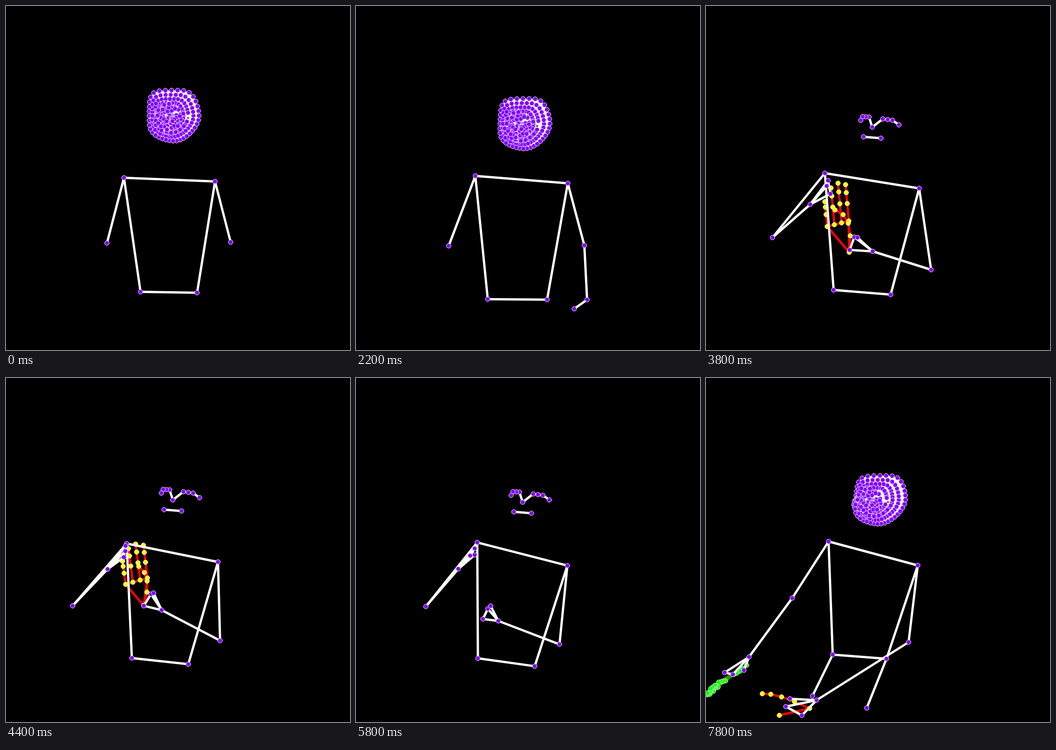
Write an HTML page with a canvas that moves like this. It is 748 px wide and 748 px high and loops after 8000 ms.

```html
<!DOCTYPE html>
<html lang="en">
<head>
<meta charset="utf-8">
<title>Body tracking</title>
<style>
  html, body { margin: 0; width: 100%; height: 100%; overflow: hidden; background: #000; }
  canvas { display: block; }
</style>
</head>
<body>
<canvas id="stage" width="748" height="748"></canvas>
<script>
const SIZE = 748, LOOP = 8000, STEP = 200;
const ctx = document.getElementById('stage').getContext('2d');
const PURPLE = '#8000ff', WHITE = '#fff';

// Key points per joint. Shorter tracks start later, off the stage, where nothing is drawn.
const TIMES = [0, 1200, 2200, 3800, 5200, 6600, 7800];
const JOINTS = {
  shoulderR: [[256,373], [261,367], [259,369], [258,363], [267,355], [258,360], [266,355]],
  shoulderL: [[454,381], [454,379], [460,385], [463,396], [457,404], [462,412], [460,407]],
  elbowR: [[219,515], [217,507], [201,521], [144,503], [145,484], [160,513], [187,478]],
  elbowL: [[488,513], [484,507], [496,520], [489,573], [433,567], [454,594], [440,574]],
  hipR: [[292,621], [284,615], [286,637], [277,617], [268,597], [260,625], [275,601]],
  hipL: [[415,623], [407,620], [415,638], [401,627], [389,615], [387,641], [392,610]],
  wristR: [[180,830], [226,431], [213,394], [234,442], [93,606]],
  pinkyR: [[190,850], [270,408], [237,364], [262,415], [40,640]],
  indexR: [[190,850], [265,379], [252,345], [265,404], [58,644]],
  thumbR: [[190,850], [262,391], [255,356], [261,422], [82,635]],
  wristL: [[515,880], [502,638], [362,533], [306,466], [313,610], [240,700]],
  pinkyL: [[480,790], [312,530], [282,448], [267,624], [208,733]],
  indexL: [[480,790], [322,502], [305,426], [261,602], [173,714]],
  thumbL: [[495,900], [474,658], [329,503], [309,419], [270,597], [182,697]],
  kneeR: [[225,775], [231,691]],
  kneeL: [[350,800], [349,717]]
};
const side = s => [['shoulder','elbow'], ['elbow','wrist'], ['shoulder','hip'], ['hip','knee'],
  ['wrist','pinky'], ['wrist','index'], ['pinky','index'], ['wrist','thumb']].map(p => p.map(n => n + s));
const BONES = [['shoulderR','shoulderL'], ['hipR','hipL'], ...side('R'), ...side('L')];

// Each hand pose: base, thumb bend, thumb tip, index knuckle and tip, pinky knuckle and tip.
const HANDS = [
  { wrist: 'wristL', line: '#f00', dot: '#ff0', clips: [
    { from: 3600, to: 5400, times: [3800, 5200], poses: [
      [[311,535], [322,455], [280,443], [310,467], [303,388], [263,479], [258,425]],
      [[283,440], [315,398], [299,364], [303,391], [292,330], [255,407], [246,362]]] },
    { from: 7600, to: 7800, times: [7800], poses: [
      [[225,718], [154,684], [122,686], [159,733], [120,790], [190,800], [150,850]]] }] },
  { wrist: 'wristR', line: '#388a08', dot: '#0f0', clips: [
    { from: 4600, to: 5600, times: [5200], poses: [
      [[210,407], [290,390], [299,361], [269,346], [295,301], [231,338], [260,293]]] },
    { from: 7400, to: 7800, times: [7800], poses: [
      [[88,624], [72,640], [60,644], [42,658], [8,687], [27,661], [10,675]]] }] }
];
const FINGER_JOINTS = [0, .48, .78, 1], FINGER_STRETCH = [1, 1.22, 1.28, 1];
const HAND_LINKS = [[0,5], [5,9], [9,13], [13,17], [0,17], [0,1]];
for (let f = 1; f < 21; f += 4) for (let i = f; i < f + 3; i++) HAND_LINKS.push([i, i + 1]);

// Nose positions while only the sparse face points show.
const NOSE_TIMES = [3800, 5200, 6600], NOSE = [[361,263], [364,267], [359,273]];
const FEATURE_LINKS = [[0,1], [1,2], [2,3], [3,4], [0,5], [5,6], [6,7], [7,8], [9,10]];

// Centre x, y and how far the head has turned away.
const FACE_TIMES = [0, 400, 1200, 2200, 3600, 7800];
const FACE = [[365,238,0], [365,234,0], [364.5,246,0], [367,255.5,.3], [370,261,.4], [379,264.5,1]];

const mix = (a, b, p) => a.map((v, n) => v + (b[n] - v) * p);
const add = (a, b) => a.map((v, n) => v + b[n]);

function sample(times, keys, t, ease = p => p) {
  const last = times.length - 1;
  if (t <= times[0]) return keys[0];
  if (t >= times[last]) return keys[last];
  const i = times.findIndex(k => k > t) - 1;
  const p = ease((t - times[i]) / (times[i + 1] - times[i]), times[i]);
  return mix(keys[i], keys[i + 1], p);
}

// The arms drop quickly in the last stretch.
const bodyEase = (p, since) => since === 6600 ? 1 - (1 - p) ** 3 : p;
const joint = (name, t) => sample(TIMES.slice(-JOINTS[name].length), JOINTS[name], t, bodyEase);
const onStage = p => p.every(v => v >= 0 && v <= SIZE);

let seed = 7;
function random() {
  seed = (seed * 16807) % 2147483647;
  return seed / 2147483647;
}

function dot([x, y], color) {
  ctx.beginPath();
  ctx.arc(x, y, 5, 0, 7);
  ctx.fillStyle = color;
  ctx.fill();
  ctx.strokeStyle = WHITE;
  ctx.lineWidth = 1;
  ctx.stroke();
}

function skeleton(points, links, lineColor, dotColor) {
  ctx.strokeStyle = lineColor;
  ctx.lineWidth = 5;
  ctx.lineCap = 'round';
  for (const [a, b] of links) {
    if (!onStage(points[a]) || !onStage(points[b])) continue;
    ctx.beginPath();
    ctx.moveTo(...points[a]);
    ctx.lineTo(...points[b]);
    ctx.stroke();
  }
  Object.values(points).filter(onStage).forEach(p => dot(p, dotColor));
}

function handPoints([base, bend, thumbTip, indexKnuckle, indexTip, pinkyKnuckle, pinkyTip]) {
  const points = [base];
  for (let p = .25; p <= 1; p += .25) points.push(mix(mix(base, bend, p), mix(bend, thumbTip, p), p));
  FINGER_STRETCH.forEach((stretch, f) => {
    const knuckle = mix(indexKnuckle, pinkyKnuckle, f / 3), tip = mix(indexTip, pinkyTip, f / 3);
    FINGER_JOINTS.forEach(p => points.push(mix(knuckle, tip, p * stretch)));
  });
  return points;
}

function drawHand({ wrist, line, dot, clips }, t) {
  const clip = clips.find(c => t >= c.from && t <= c.to);
  if (!clip) return;
  const { times, poses } = clip;
  const held = Math.max(times[0], Math.min(times[times.length - 1], t));
  const now = joint(wrist, t), anchor = joint(wrist, held);
  const shift = [now[0] - anchor[0], now[1] - anchor[1]];
  const pose = poses[0].map((_, i) => add(sample(times, poses.map(k => k[i]), t), shift));
  skeleton(handPoints(pose), HAND_LINKS, line, dot);
}

function drawFeatures(t) {
  const nose = sample(NOSE_TIMES, NOSE, t);
  const offsets = [[0, 0]];
  for (let i = 0; i < 3; i++) offsets.push([23 + 10.5 * i, -18 + 1.5 * i]);
  offsets.push([58, -5]);
  for (let i = 0; i < 3; i++) offsets.push([-7 - 7 * i, -22 - i / 2]);
  offsets.push([-25, -15], [-19, 21], [19, 24]);
  skeleton(offsets.map(o => add(o, nose)), FEATURE_LINKS, WHITE, PURPLE);
}

// A superellipse, squarest at the upper left and roundest at the lower right.
function outlinePoint(a) {
  const e = .79 + .37 * Math.cos(a - Math.PI / 4);
  const bulge = v => Math.sign(v) * Math.abs(v) ** e;
  return [54 * bulge(Math.cos(a)), 55 * bulge(Math.sin(a))];
}

// Dots spread along the outline, wider apart over the forehead.
function makeOutline(count) {
  const fine = [], lengths = [];
  let total = 0;
  for (let i = 0; i < 1440; i++) {
    const a = i * Math.PI / 720, p = outlinePoint(a), q = fine[i - 1] || p;
    total += Math.hypot(p[0] - q[0], p[1] - q[1]) * (1 + .25 * Math.sin(a));
    fine.push(p);
    lengths.push(total);
  }
  return Array.from({ length: count }, (_, n) => fine[lengths.findIndex(l => l >= total * n / count)]);
}

const OUTLINE = makeOutline(36);
// Each mesh dot: an outline point drawn in towards the nose, plus an offset.
const MESH = [1, .83, .67, .52].flatMap(k => OUTLINE.map(rim => ({ rim, k, offset: [0, 0] })));
for (let i = 0; i < 140; i++) {
  const r = Math.sqrt(random()), a = random() * 7;
  MESH.push({ rim: [0, 0], k: 0, offset: [2 + 30 * r * Math.cos(a), 3 + 32 * r * Math.sin(a)] });
}
MESH.forEach(d => d.order = random());
MESH.sort((a, b) => a.order - b.order);

function drawFace(t) {
  const [cx, cy, turn] = sample(FACE_TIMES, FACE, t);
  const center = [-16 - 14 * turn, 2], eye = [center[0] + 47, 5];
  const place = ([x, y]) => [cx + x - .08 * turn * y, cy + y * (1 - .045 * turn)];

  ctx.beginPath();
  OUTLINE.forEach(p => ctx.lineTo(...place(p)));
  ctx.fillStyle = WHITE;
  ctx.fill();
  const [ex, ey] = place(eye);
  ctx.fillStyle = '#000';
  ctx.fillRect(ex - 3, ey - 1, 5, 2);

  for (const { rim, k, offset } of MESH) {
    const p = add(mix(center, rim, k), offset);
    if (Math.hypot((p[0] - eye[0]) / 8, (p[1] - eye[1]) / 5) > 1) dot(place(p), PURPLE);
  }
}

function draw(t) {
  ctx.fillStyle = '#000';
  ctx.fillRect(0, 0, SIZE, SIZE);
  ctx.save();
  ctx.translate(.5, .5);
  HANDS.forEach(hand => drawHand(hand, t));
  const body = {};
  for (const name in JOINTS) body[name] = joint(name, t);
  skeleton(body, BONES, WHITE, PURPLE);
  if (t <= 3600 || t >= 7400) drawFace(t);
  else drawFeatures(t);
  ctx.restore();
}

const start = performance.now();
function frame() {
  const elapsed = Math.max(0, performance.now() - start) % LOOP;
  draw(Math.floor(elapsed / STEP) * STEP);
  requestAnimationFrame(frame);
}
frame();
</script>
</body>
</html>
```
